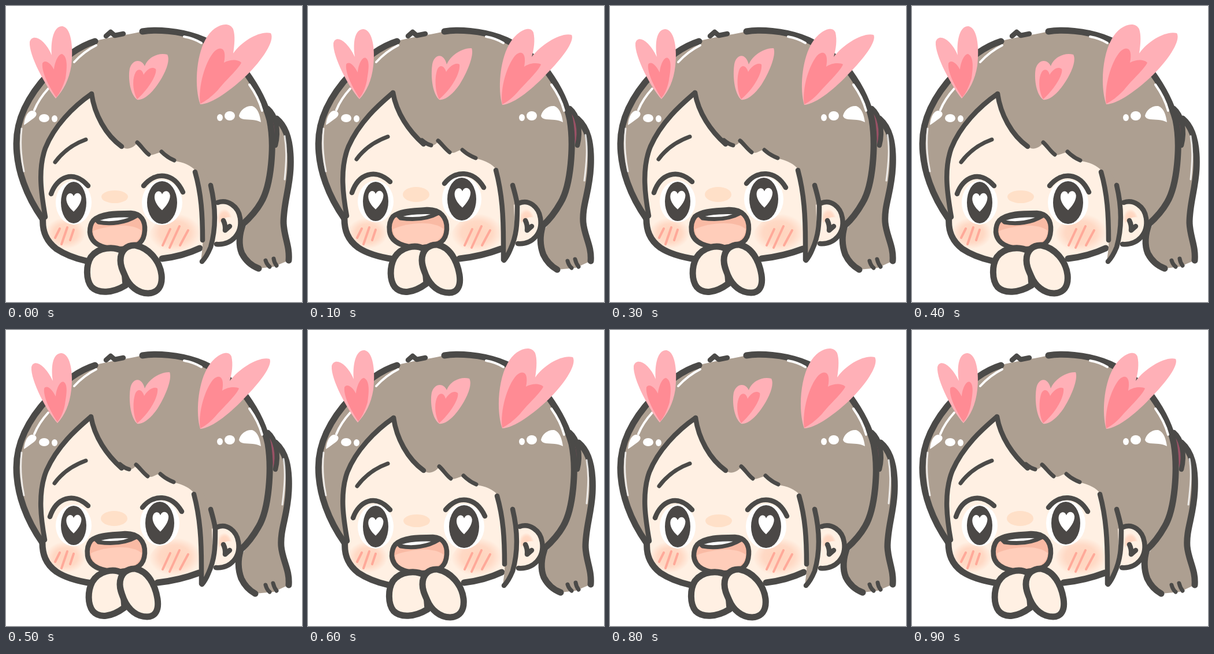
Animation of 512 by 512 pixels, one loop 1000 ms. Source, as an HTML page:

```html
<!DOCTYPE html>
<html lang="en">
<head>
<meta charset="utf-8">
<title>Heart eyes</title>
<style>
  html, body { margin: 0; width: 100%; height: 100%; overflow: hidden; background: #fff; }
  svg { display: block; width: 100vw; height: 100vh; }
  .line { fill: none; stroke: #4b4a48; stroke-width: 8.5; stroke-linecap: round; stroke-linejoin: round; }
  .edge { stroke-width: 11; }
  .thin { stroke-width: 7; }
  .hair { fill: #ad9f91; }
  .skin { fill: #fff0e3; }
  .blush { fill: url(#warm); }
  .scratch { fill: none; stroke: #ffa999; stroke-width: 4; stroke-linecap: round; }
  .white { fill: #fff; }
  .shine { fill: none; stroke: #fff; stroke-width: 4; stroke-linecap: round; }
  .faint { stroke-width: 3; opacity: .8; }
  .iris { fill: #4b4846; }
  .nose { fill: #ffe0c8; }
  .mouth { fill: #f9baa4; }
  .tongue { fill: #ffcdba; }
  .tie { fill: #9a5266; }
  .outer { fill: #ffb0b7; }
  .inner { fill: #ff8b94; }
</style>
</head>
<body>
<svg id="stage" viewBox="0 0 512 512">
  <defs>
    <radialGradient id="warm">
      <stop offset="0" stop-color="#ffd3bc"/>
      <stop offset=".6" stop-color="#ffd9c5"/>
      <stop offset="1" stop-color="#fff0e3"/>
    </radialGradient>
  </defs>
</svg>
<script>
const BEAT = 100;
const stage = document.getElementById("stage");

const path = (cls, d) => `<path class="${cls}" d="${d}"/>`;
const oval = (cls, x, y, rx, ry) => `<ellipse class="${cls}" cx="${x}" cy="${y}" rx="${rx}" ry="${ry}"/>`;
const heart = (x, y, s) => `<path class="white" transform="translate(${x} ${y}) scale(${s})"
  d="M0 15C-7 9-13 0-11-8C-9-15-2-15 0-9C3-16 11-15 12-7C12 1 6 9 0 15Z"/>`;

const crownLeft = "M63 368C36 330 18 284 18 238C18 190 43 150 74 117C97 92 125 70 154 61";
const crownTop = "C175 54 205 51 236 44";

const shines = path("shine faint", "M27 212C24 238 26 262 31 286") +
  path("shine", "M49 180C55 165 63 154 73 143") +
  path("shine", "M118 97C129 85 142 75 156 68") +
  path("shine", "M308 53Q325 56 338 64") +
  path("shine", "M421 136C431 150 439 166 443 181") +
  path("white", "M31 206C32 193 37 181 46 181C54 182 55 189 48 194C42 198 36 203 31 206Z") +
  oval("white", 66, 194, 9, 7) + oval("white", 84, 195, 5, 6) +
  oval("white", 370, 193, 5, 6) + oval("white", 387, 190, 9, 8) +
  path("white", "M403 190C405 180 415 172 426 173C436 177 439 188 441 201C432 196 422 197 412 196Q404 195 403 190Z");

const wide = {
  crownRight: "C260 40 300 43 330 54C365 66 396 92 415 115C433 140 448 167 456 197C465 240 459 310 441 340C432 356 420 368 409 378",
  tail: "M468 195C486 210 494 240 492 282C490 318 480 342 480 375C481 400 491 415 489 440",
  tailLeft: "M410 377C403 395 402 414 408 428Q418 447 437 454",
  tailEnd: "L463 451L437 454C417 448 402 425 405 400C420 365 455 335 462 240Z",
  tailShine: "M482 225C486 248 485 270 482 300",
  tips: "M449 440Q451 447 456 451M463 437Q464 444 468 449",
  bangLeft: "M148 152C116 174 83 208 68 246C54 285 62 330 68 365",
  bang: "M148 152C153 187 172 223 200 243",
  fringe: "C207 249 218 248 227 237L246 257C254 260 262 253 269 253L291 268C307 270 320 276 327 284",
  strands: "M227 236C234 242 239 251 247 257M269 252Q279 262 291 267",
  lock: "M327 284C338 325 340 365 342 400L337 442C354 426 362 400 360 365L354 308L340 280Z",
  lockLines: "M327 287C338 325 340 362 340 405M354 310C363 348 364 382 354 417Q347 434 339 442",
  ear: "M366 340C383 334 402 346 405 367C409 394 390 414 364 412",
  brow: "M85 270C99 251 116 239 138 231",
  lashes: "M78 325C88 296 117 282 142 311M238 311C258 286 290 287 306 322",
  eyes: [[117, 340, 22, 36], [270, 340, 26, 37]],
  glints: [[117, 339, 1.12], [270, 336, 1.15]],
  nose: [188, 330, 23, 11],
  mouth: "M151 371C164 358 190 358 216 358C234 359 241 372 240 388C239 406 232 417 200 420C168 421 147 412 145 391Q145 378 151 371Z",
  tongue: "M151 389C176 380 216 374 235 389C232 409 217 416 190 416C168 416 150 407 151 389Z",
  teeth: "M156 370C170 362 200 361 226 363C207 375 181 378 160 374Z",
  chin: "M64 366C62 389 69 406 87 420Q108 434 139 441M270 437C295 434 316 428 335 419",
  handL: "M202 424C186 415 160 417 147 434C138 448 138 474 148 486C160 498 184 497 207 483Z",
  handR: "M198 440C198 422 210 413 224 414C248 419 266 441 269 465C271 486 262 496 246 497C228 497 213 484 206 467C201 456 198 449 198 440Z",
  hearts: [
    ["M86 160C69 139 39 85 41 62C46 46 68 58 79 85C77 58 83 34 98 35C115 39 116 78 113 103C109 128 99 146 86 160Z",
     "M87 158C76 142 61 115 63 99C67 92 77 98 83 110C84 97 91 82 97 83C108 88 105 111 103 125C98 142 92 152 87 158Z"],
    ["M227 162C214 152 211 124 214 108C219 92 234 91 240 104C246 88 264 80 279 84C285 94 275 118 262 136C252 151 237 164 227 162Z",
     "M227 161C219 148 218 126 224 115C229 107 236 110 238 119C244 109 253 104 259 109C262 117 248 142 227 161Z"],
    ["M336 170C326 142 328 89 345 58C358 33 385 24 393 40C397 52 395 68 393 82C408 60 440 42 458 47C466 60 442 95 416 120C391 144 356 170 336 170Z",
     "M336 169C332 141 344 97 360 79C373 67 382 75 377 98C387 92 402 92 407 98C402 109 382 126 366 146C355 157 345 165 336 169Z"]
  ]
};

const perked = {
  crownRight: "C260 40 300 43 330 54C365 66 396 92 415 115C433 140 447 167 453 197C460 240 455 310 437 340C428 356 417 370 406 380",
  tail: "M466 195C483 210 491 235 489 278C487 322 474 344 476 374C478 398 491 415 489 441",
  tailLeft: "M406 380C401 396 401 414 407 430Q415 447 431 456",
  tailEnd: "L463 453L431 456C413 448 400 425 402 400C420 365 452 335 457 240Z",
  tailShine: "M480 223C484 245 482 270 478 302",
  tips: "M449 441Q451 449 456 453M462 438Q464 446 468 451",
  bangLeft: "M147 150C125 169 90 198 70 243C54 282 61 330 67 363",
  bang: "M147 150C153 185 174 216 200 239",
  fringe: "C210 242 219 244 225 234L244 253C254 257 260 248 267 249L291 264C307 267 319 274 325 282",
  strands: "M197 232Q205 239 213 241M225 233C232 239 237 247 245 253M267 249Q277 258 290 263",
  lock: "M325 282C336 325 338 365 339 400L337 442C351 426 358 400 357 365L354 308L340 280Z",
  lockLines: "M325 284C336 325 338 365 338 410L338 439M354 310C359 328 362 338 362 346C362 377 361 397 350 421Q345 433 339 440",
  ear: "M365 341C382 334 399 347 402 367C406 393 388 413 363 411",
  brow: "M84 265C97 247 116 234 138 226",
  lashes: "M76 323C87 290 117 280 142 304M236 307C254 284 286 283 304 314",
  eyes: [[117, 338, 22, 34], [266, 334, 25, 37]],
  glints: [[117, 335, 1.12], [267, 331, 1.18]],
  nose: [187, 326, 23, 13],
  mouth: "M147 364C161 353 184 354 205 352C229 351 241 366 240 386C239 406 229 414 200 417C167 419 144 410 141 390Q139 374 147 364Z",
  tongue: "M147 386C171 375 216 370 235 386C232 406 217 413 190 413C166 413 147 405 147 386Z",
  teeth: "M156 363C172 357 203 355 226 358C206 369 181 370 160 367Z",
  chin: "M63 363C62 388 69 405 87 418Q108 432 148 438M262 437C290 434 313 428 334 420",
  handL: "M200 420C186 412 161 416 149 436C141 452 141 474 150 486C161 499 182 497 205 480Z",
  handR: "M197 440C197 421 210 412 224 413C245 417 258 440 262 465C265 485 258 496 244 496C226 496 212 484 204 466C200 456 197 449 197 440Z",
  hearts: [
    ["M89 161C72 143 42 87 44 64C48 49 68 60 81 88C77 60 82 40 96 40C113 42 116 78 113 103C110 130 101 148 89 161Z",
     "M89 159C78 143 64 116 66 101C71 94 80 103 86 115C87 101 94 87 100 90C108 95 104 115 102 128C99 144 94 153 89 159Z"],
    ["M227 162C215 151 212 121 215 101C218 84 234 79 240 101C247 85 267 72 283 73C288 85 275 116 262 136C252 151 237 164 227 162Z",
     "M227 161C219 148 219 122 224 109C229 100 236 104 239 114C245 103 256 97 262 101C264 114 250 142 227 161Z"],
    ["M336 171C328 143 332 96 347 68C361 42 385 32 390 46C393 59 391 74 387 88C404 66 438 45 456 50C462 61 438 92 414 116C392 140 357 170 336 171Z",
     "M336 170C332 143 344 103 358 86C371 74 378 84 374 105C384 98 398 98 403 101C400 110 381 129 365 146C355 158 345 166 336 170Z"]
  ]
};

function head(p) {
  const face = `${p.bang}${p.fringe}C337 325 342 370 340 421C300 432 270 437 235 445L139 441` +
    "C90 429 64 410 64 368L68 365C62 330 54 285 68 246C83 208 116 174 148 152Z";
  return path("hair", p.tail + p.tailEnd) + path("line edge", p.tail) +
    path("shine faint", p.tailShine) +
    path("line edge", p.tailLeft) + path("line thin", p.tips) +
    path("tie", "M452 176Q468 190 472 215Q470 235 463 243Z") +
    path("line", "M453 177C466 188 473 214 466 241") +
    path("hair", crownLeft + crownTop + p.crownRight + "L365 345L340 420L68 368Z") +
    path("line edge", crownLeft) + path("line edge", "M236 44" + p.crownRight) +
    path("line", "M173 52L181 45L188 51L203 48") +
    path("skin", face) +
    path("skin", p.ear + "L340 420L352 345Z") +
    path("blush", "M366 353Q383 345 391 366Q375 362 365 383Z") +
    path("line", p.ear) + path("line", "M376 371Q380 379 379 388L387 381");
}

function face(p) {
  const eye = ([x, y, rx, ry]) => oval("white", x, y, rx + 9, ry + 2) + oval("iris", x, y, rx, ry);
  return oval("blush", 103, 393, 35, 27) +
    path("blush", "M247 400C250 370 290 355 333 360L337 416C302 432 258 428 247 400Z") +
    path("scratch", "M93 385L85 401M106 383L96 412M117 387L111 405") +
    path("scratch", "M284 386L271 414M300 381L283 418M315 388L301 414") +
    oval("nose", ...p.nose) +
    p.eyes.map(eye).join("") + p.glints.map(g => heart(...g)).join("") +
    path("line", p.lashes) + path("line thin", p.brow) +
    path("mouth", p.mouth) + path("tongue", p.tongue) + path("line", p.mouth) +
    path("white", p.teeth) + path("line thin", p.teeth) +
    path("line edge", p.chin);
}

function front(p) {
  const hand = d => path("skin", d) + path("line edge", d);
  return path("hair", p.lock) + path("line", p.lockLines) +
    path("line", p.bangLeft) + path("line", p.bang) + path("line thin", p.strands) +
    hand(p.handL) + hand(p.handR) + shines +
    p.hearts.map(([big, small]) => path("outer", big) + path("inner", small)).join("");
}

const groups = [wide, perked].map(p => {
  const g = document.createElementNS("http://www.w3.org/2000/svg", "g");
  g.innerHTML = head(p) + face(p) + front(p);
  return stage.appendChild(g);
});

function tick(now) {
  const current = Math.floor(now / BEAT) % groups.length;
  groups.forEach((g, i) => g.setAttribute("visibility", i === current ? "visible" : "hidden"));
  requestAnimationFrame(tick);
}
tick(0);
</script>
</body>
</html>
```
